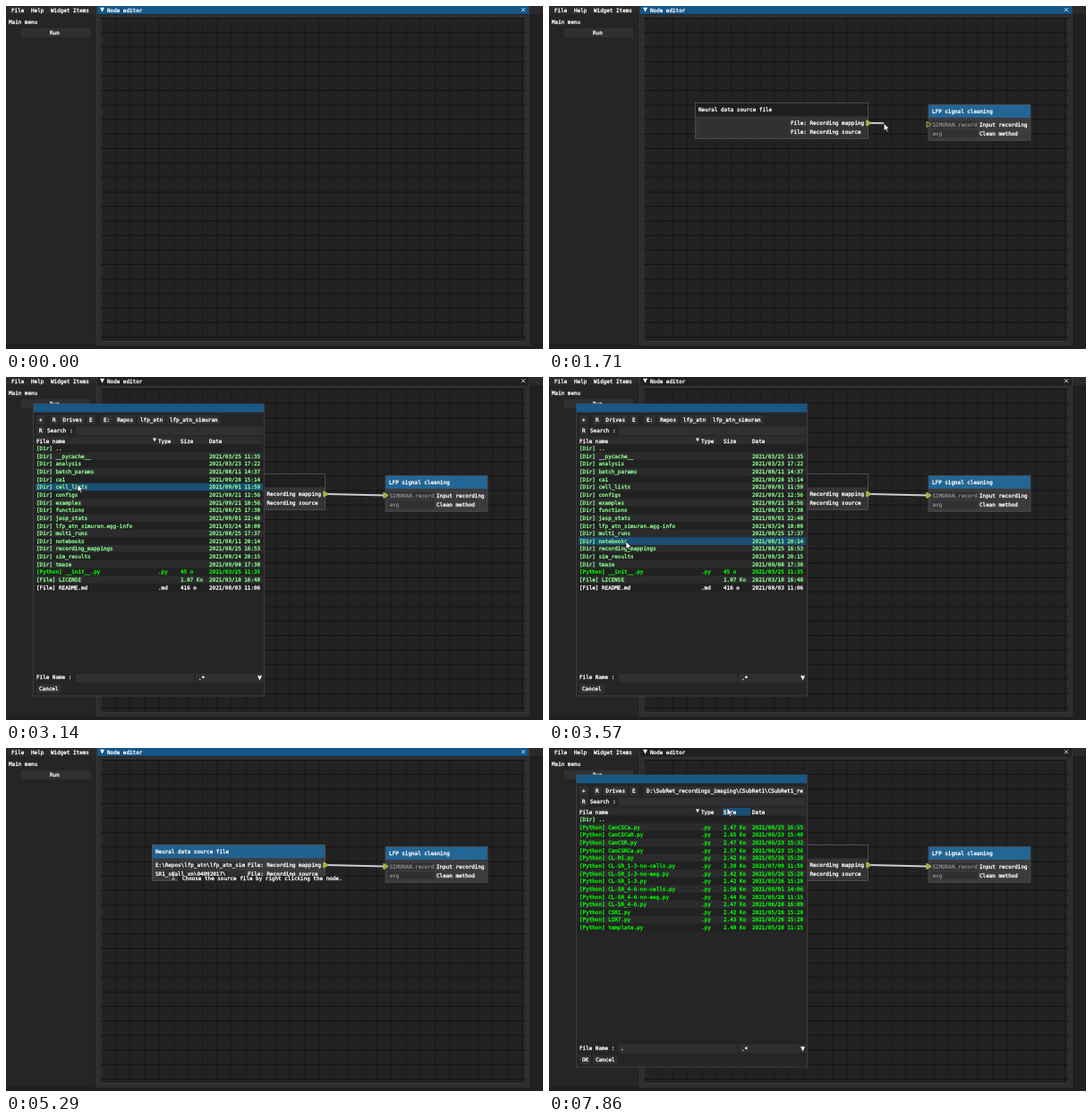
These frames come from a looping animation (600x384 px, 8 s). An HTML page with a canvas:

```html
<!DOCTYPE html>
<html lang="en">
<head>
<meta charset="utf-8">
<title>Node editor</title>
<style>
html, body { margin: 0; width: 100%; height: 100%; overflow: hidden; background: #252526; }
canvas { display: block; width: 600px; height: 384px; }
</style>
</head>
<body>
<canvas id="stage" width="600" height="384"></canvas>
<script>
const ctx = document.getElementById('stage').getContext('2d');
const LOOP = 8000, STEP = 1000 / 7, CHAR = 3.57, ROW = 8.64;
const WHITE = '#fff', BLUE = '#20618f', HOVER = '#1b4f74', FIELD = '#303033', PANEL = '#252526', EDGE = '#454548';
const FILE_COLORS = { Dir: '#8dff8d', Python: '#00ff00', File: WHITE };

// Moments of the session, in ms
const SOURCE_ADDED = 500, CLEANER_ADDED = 1280, LINK_START = 1560, LINK_END = 1990;
const MENUS = [[2135, 2425], [5990, 6705]];
const DIALOGS = [[2425, 4850], [6705, LOOP]];
const TOOLTIP = [5140, 5850];

// Mouse positions: time, x, y
const MOUSE = [
  [140, 250, 200], [430, 163, 109], [857, 432, 123], [1290, 424, 111], [1571, 357, 131],
  [2000, 423, 132], [2143, 193, 140], [2400, 217, 167], [2571, 99, 77], [2857, 131, 48],
  [3143, 80, 120], [3571, 86, 184], [3857, 86, 190], [4143, 70, 125], [4430, 68, 131],
  [4714, 40, 349], [5000, 110, 210], [5286, 187, 143], [5714, 190, 142], [5857, 193, 140],
  [6429, 217, 167], [6714, 217, 167], [7143, 170, 120], [7857, 199, 67], [8000, 199, 67]
];

const parse = text => text.trim().split('\n').map(line => line.split('|'));
const VIEWS = {
  project: {
    crumbs: ['E:', 'Repos', 'SIMURAN'], type: 109, size: 191, arrow: [104, -1], ok: true,
    rows: parse(`
Dir|tests|||2021/03/31 09:32
Dir|simuran.egg-inf|||2021/10/13 16:25
Dir|simuran|||2021/10/13 16:06
Python|setup.py|.py|2.09 Ko|2021/10/13 16:06
File|requirements.t|.txt|335 o|2021/10/13 16:06
File|README.md|.md|3.73 Ko|2021/07/19 17:29
File|LICENSE||34.98 Ko|2020/03/18 15:08
File|frozen.txt|.txt|2.37 Ko|2021/06/15 18:51
Dir|examples|||2021/10/14 10:26
Dir|docs|||2021/02/02 15:00
Dir|__pycache__|||2020/05/15 18:17
Dir|.vscode|||2020/07/24 11:18
File|.travis.yml|.yml|254 o|2020/07/02 20:14
File|.readthedocs.y|.yml|527 o|2020/07/03 17:11
Dir|.pytest_cache|||2020/03/19 11:36
Dir|.idea|||2021/03/23 15:50
File|.gitignore|.gitignore|2.08 Ko|2021/10/14 10:26
File|.git-blame-ign|.git-blame-ignore-revs|67 o|2020/07/02 20:14
Dir|.git|||2021/10/15 12:52
Dir|..|||`)
  },
  analysis: {
    crumbs: ['E:', 'Repos', 'lfp_atn', 'lfp_atn_simuran'], type: 170, size: 195, arrow: [166, 1], ok: false,
    rows: parse(`
Dir|..|||
Dir|__pycache__|||2021/03/25 11:35
Dir|analysis|||2021/03/23 17:22
Dir|batch_params|||2021/08/11 14:37
Dir|ca1|||2021/09/28 15:14
Dir|cell_lists|||2021/09/01 11:59
Dir|configs|||2021/09/21 12:56
Dir|examples|||2021/09/21 10:56
Dir|functions|||2021/08/25 17:38
Dir|jasp_stats|||2021/09/01 22:48
Dir|lfp_atn_simuran.egg-info|||2021/03/24 18:09
Dir|multi_runs|||2021/08/25 17:37
Dir|notebooks|||2021/08/11 20:14
Dir|recording_mappings|||2021/08/25 16:53
Dir|sim_results|||2021/09/24 20:15
Dir|tmaze|||2021/09/08 17:38
Python|__init__.py|.py|45 o|2021/03/25 11:35
File|LICENSE||1.07 Ko|2021/03/18 16:48
File|README.md|.md|416 o|2021/08/03 11:06`)
  },
  mappings: {
    crumbs: ['E:', 'Repos', 'lfp_atn', 'lfp_atn_simuran', 'recording_mappings'],
    type: 170, size: 195, arrow: [166, 1], ok: true,
    rows: parse(`
Dir|..|||
Python|CanCSCa.py|.py|2.47 Ko|2021/08/25 16:55
Python|CanCSCaR.py|.py|2.65 Ko|2021/06/23 15:48
Python|CanCSR.py|.py|2.47 Ko|2021/06/23 15:32
Python|CanCSRCa.py|.py|2.57 Ko|2021/06/23 15:36
Python|CL-RS.py|.py|2.42 Ko|2021/05/26 15:28
Python|CL-SR_1-3-no-cells.py|.py|2.39 Ko|2021/07/09 11:58
Python|CL-SR_1-3-no-eeg.py|.py|2.42 Ko|2021/05/26 15:28
Python|CL-SR_1-3.py|.py|2.42 Ko|2021/05/26 15:28
Python|CL-SR_4-6-no-cells.py|.py|2.58 Ko|2021/09/01 14:06
Python|CL-SR_4-6-no-eeg.py|.py|2.44 Ko|2021/05/28 11:15
Python|CL-SR_4-6.py|.py|2.47 Ko|2021/06/28 16:09
Python|CSR1.py|.py|2.42 Ko|2021/05/26 15:28
Python|LSR7.py|.py|2.43 Ko|2021/05/26 15:28
Python|template.py|.py|2.48 Ko|2021/05/28 11:15`)
  }
};
VIEWS.recordings = { ...VIEWS.mappings, crumbs: ['D:\\SubRet_recordings_imaging\\CSubRet1\\CSubRet1_re'] };

const within = (t, [start, end]) => t >= start && t < end;

function box(x, y, right, bottom, fill, stroke) {
  ctx.fillStyle = fill;
  ctx.fillRect(x, y, right - x, bottom - y);
  if (stroke) frame(x, y, right, bottom, stroke);
}

function frame(x, y, right, bottom, color) {
  ctx.strokeStyle = color;
  ctx.lineWidth = 0.8;
  ctx.strokeRect(x, y, right - x, bottom - y);
}

function shape(points, fill, stroke, width = 0.8) {
  ctx.beginPath();
  points.forEach(([x, y]) => ctx.lineTo(x, y));
  ctx.closePath();
  if (fill) { ctx.fillStyle = fill; ctx.fill(); }
  if (stroke) { ctx.strokeStyle = stroke; ctx.lineWidth = width; ctx.stroke(); }
}

function line(x1, y1, x2, y2, color, width = 0.8) {
  ctx.strokeStyle = color;
  ctx.lineWidth = width;
  ctx.beginPath();
  ctx.moveTo(x1, y1);
  ctx.lineTo(x2, y2);
  ctx.stroke();
}

// Drawn large and scaled down so that small glyphs keep fractional advances;
// the thin outline gives the strokes a full pixel of weight
function text(string, x, y, color = WHITE, right = 600) {
  ctx.save();
  ctx.beginPath();
  ctx.rect(x - 1, y - 5, right - x + 1, 10);
  ctx.clip();
  ctx.translate(x, y + 2.1);
  ctx.scale(0.1, 0.1);
  ctx.font = '59.3px "DejaVu Sans Mono", monospace';
  ctx.textRendering = 'geometricPrecision';
  ctx.fillStyle = ctx.strokeStyle = color;
  ctx.lineWidth = 3;
  ctx.lineJoin = 'round';
  ctx.fillText(string, 0, 0);
  ctx.strokeText(string, 0, 0);
  ctx.restore();
}

function button(label, x, y, fill = FIELD) {
  box(x - 3, y - 5, x + label.length * CHAR + 3, y + 5, fill);
  text(label, x, y, WHITE, 286);
  return x + label.length * CHAR + 8;
}

function arrow(x, y, direction, size = 2.5) {
  shape([[x - size, y - size * direction], [x + size, y - size * direction], [x, y + size * direction]], WHITE);
}

function cross(x, y) {
  line(x - 2, y - 2, x + 2, y + 2, WHITE);
  line(x - 2, y + 2, x + 2, y - 2, WHITE);
}

function pin(x, y, filled) {
  shape([[x - 2, y - 3], [x + 3, y], [x - 2, y + 3]], filled ? '#99aa42' : '#2c2f22', '#a3c04a', 1);
}

function mouseAt(t) {
  const next = MOUSE.findIndex(key => key[0] > t);
  if (next === 0) return null;
  if (next < 0) return MOUSE[MOUSE.length - 1].slice(1);
  const [t0, x0, y0] = MOUSE[next - 1], [t1, x1, y1] = MOUSE[next];
  const p = (t - t0) / (t1 - t0), eased = p * p * (3 - 2 * p);
  return [x0 + (x1 - x0) * eased, y0 + (y1 - y0) * eased];
}

function drawWorkspace(active) {
  box(0, 0, 600, 384, PANEL);
  box(0, 0, 600, 9, '#2a2a2d');
  box(585, 9, 600, 384, '#221f21');
  box(0, 379, 600, 384, '#211f21');
  text('File', 6, 4.5);
  text('Help', 28, 4.5);
  text('Widget Items', 50, 4.5);
  text('Main menu', 3, 18);
  box(17, 25, 94, 35, FIELD);
  text('Run', 49, 30);

  box(101.5, 0, 584.5, 379.5, PANEL, '#3c3c3f');
  box(102, 0, 584, 9, active ? '#145687' : '#202022');
  arrow(107.5, 4.3, 1);
  text('Node editor', 113, 4.5);
  cross(578, 4.3);
  frame(103.5, 11, 582.5, 377.5, '#3d3d40');
  box(106, 13, 580, 375.5, '#222223', '#444447');
  for (let x = 122.3; x < 580; x += 16.23) line(x, 13, x, 375, '#1a1a1b');
  for (let y = 13.5; y < 375; y += 16.23) line(106, y, 580, y, '#121213', 1);
}

function drawSource(t, hovered, linked) {
  box(163.5, 108.5, 356.5, 148.5, hovered ? '#3b3b3d' : '#343436');
  box(163.5, 108.5, 356.5, 123.5, hovered ? BLUE : '#1e1e1f');
  frame(163.5, 108.5, 356.5, 148.5, '#555557');
  text('Neural data source file', 167, 116);
  box(167.5, 127, 268.5, 135.5, FIELD);
  box(167.5, 137, 268.5, 145.5, FIELD);
  text('File: Recording mapping', 270, 131);
  text('File: Recording source', 270, 141);
  if (t >= DIALOGS[0][1]) text('E:\\Repos\\lfp_atn\\lfp_atn_sim', 167, 131, WHITE, 269);
  if (t >= TOOLTIP[0]) text('SR1_small_xn\\04092017\\', 167, 141, WHITE, 269);
  pin(357, 131, linked);
}

function drawCleaner(linked) {
  box(424, 110.5, 538, 150.5, '#3b3b3d');
  box(424, 110.5, 538, 125, '#236695');
  frame(424, 110.5, 538, 150.5, '#4e4e51');
  text('LFP signal cleaning', 428, 117.5);
  box(427.5, 128.5, 479, 137, FIELD);
  box(427.5, 138.5, 479, 147, FIELD);
  text('SIMURAN.record', 428.5, 133, '#848486', 479);
  text('avg', 428.5, 142.5, '#848486');
  text('Input recording', 481, 133);
  text('Clean method', 481, 142.5);
  pin(424, 132.5, linked);
}

function drawContextMenu(mouse) {
  box(0, 0, 600, 384, 'rgba(32,32,33,0.55)');
  box(193, 140, 302, 190.5, PANEL, '#56565a');
  box(193, 140, 302, 149.5, '#15588b');
  text('Node context', 195, 145);
  cross(296, 145);
  const over = (top, bottom) => mouse[1] >= top && mouse[1] < bottom ? BLUE : FIELD;
  box(196.5, 153.5, 298.5, 163, over(153, 163));
  box(196.5, 165, 298.5, 175, over(165, 175));
  box(235, 177, 273, 187, over(177, 187));
  text('Show plots', 229, 158.5);
  text('Select file path', 219, 170.3);
  text('Close', 245, 182);
}

function drawDialog(view, [mx, my]) {
  box(30.5, 30, 288.5, 357, PANEL, EDGE);
  box(31, 30, 288, 39.5, '#195885');
  ctx.save();
  ctx.beginPath();
  ctx.rect(31, 30, 256.5, 327);
  ctx.clip();
  button('+', 37, 48);
  ['R', 'Drives', 'E'].reduce((x, label) => button(label, x, 48), 52);
  view.crumbs.reduce((x, label) => button(label, x, 48), 109);
  button('R', 37, 60);
  text('Search :', 46, 60);
  box(78, 55.5, 287, 65, FIELD);

  box(33, 66.5, 287, 75.5, '#2d2d30');
  const columns = [['File name', 34], ['Type', view.type], ['Size', view.size], ['Date', 227]];
  columns.forEach(([label, x], i) => {
    const right = i < 3 ? columns[i + 1][1] - 2 : 287;
    if (my >= 66 && my < 76 && mx >= x && mx < right) box(x - 1, 67, right, 76, HOVER);
    text(label, x, 71.5);
  });
  arrow(view.arrow[0], 70.5, view.arrow[1], 2);

  const hovered = Math.floor((my - 75.7) / ROW);
  view.rows.forEach(([kind, name, type, size, date], i) => {
    const y = 80 + i * ROW;
    const color = name === 'LICENSE' ? FILE_COLORS.Dir : FILE_COLORS[kind];
    box(33, y - 4.3, 287, y + 4.3, i === hovered ? HOVER : i % 2 ? '#2b2b2d' : '#212122');
    text(`[${kind}] ${name}`, 34, y, color, view.type);
    text(type, view.type, y, color, view.size - 1);
    text(size, view.size, y, color, 227);
    text(date, 227, y, color);
  });

  text('File Name :', 34, 336);
  box(78, 332, 210, 341.5, FIELD);
  box(212, 332, 287, 341.5, FIELD);
  if (view.ok) text('.', 80, 336);
  text('.*', 215, 336.5);
  arrow(283.5, 337, 1);
  button('Cancel', view.ok ? button('OK', 37, 349) : 37, 349);
  ctx.restore();
}

function drawTooltip() {
  box(192, 143, 379, 150.5, '#232324');
  text('Choose the source file by right clicking the node.', 197, 146);
}

function drawMouse([x, y], editing) {
  if (editing) {
    line(x, y - 4, x, y + 4, '#d0d0d0');
    line(x - 2, y - 4, x + 2, y - 4, '#d0d0d0');
    line(x - 2, y + 4, x + 2, y + 4, '#d0d0d0');
    return;
  }
  const outline = [[0, 0], [0, 8.6], [2, 6.8], [3.3, 9.8], [4.7, 9.2], [3.5, 6.3], [6, 6.2]];
  shape(outline.map(([dx, dy]) => [x + dx, y + dy]), '#fff', '#111', 0.7);
}

function currentView(t) {
  if (t >= DIALOGS[1][0]) return VIEWS.recordings;
  return t < 3135 ? VIEWS.project : t < 3990 ? VIEWS.analysis : VIEWS.mappings;
}

function render(t) {
  const mouse = mouseAt(t);
  const menu = MENUS.some(span => within(t, span));
  const dialog = DIALOGS.some(span => within(t, span));
  const tooltip = within(t, TOOLTIP);
  const linked = t >= LINK_END;
  const overSource = mouse && !menu && !dialog &&
    mouse[0] > 163 && mouse[0] < 356 && mouse[1] > 108 && mouse[1] < 149;

  drawWorkspace(!menu && !dialog);
  if (t >= SOURCE_ADDED) drawSource(t, overSource, linked);
  if (t >= CLEANER_ADDED) drawCleaner(linked);
  if (t >= LINK_START) {
    const [x, y] = linked ? [423, 132.5] : mouse;
    line(358, 131, x, y, '#cfcbd2', 1.8);
    pin(357, 131, true);
    if (linked) pin(424, 132.5, true);
  }
  if (tooltip) drawTooltip();
  if (menu) drawContextMenu(mouse);
  if (dialog) drawDialog(currentView(t), mouse);
  if (mouse) drawMouse(mouse, tooltip);
}

function tick(now) {
  render(Math.floor((now % LOOP + 5) / STEP) * STEP % LOOP);
  requestAnimationFrame(tick);
}
requestAnimationFrame(tick);
</script>
</body>
</html>
```
